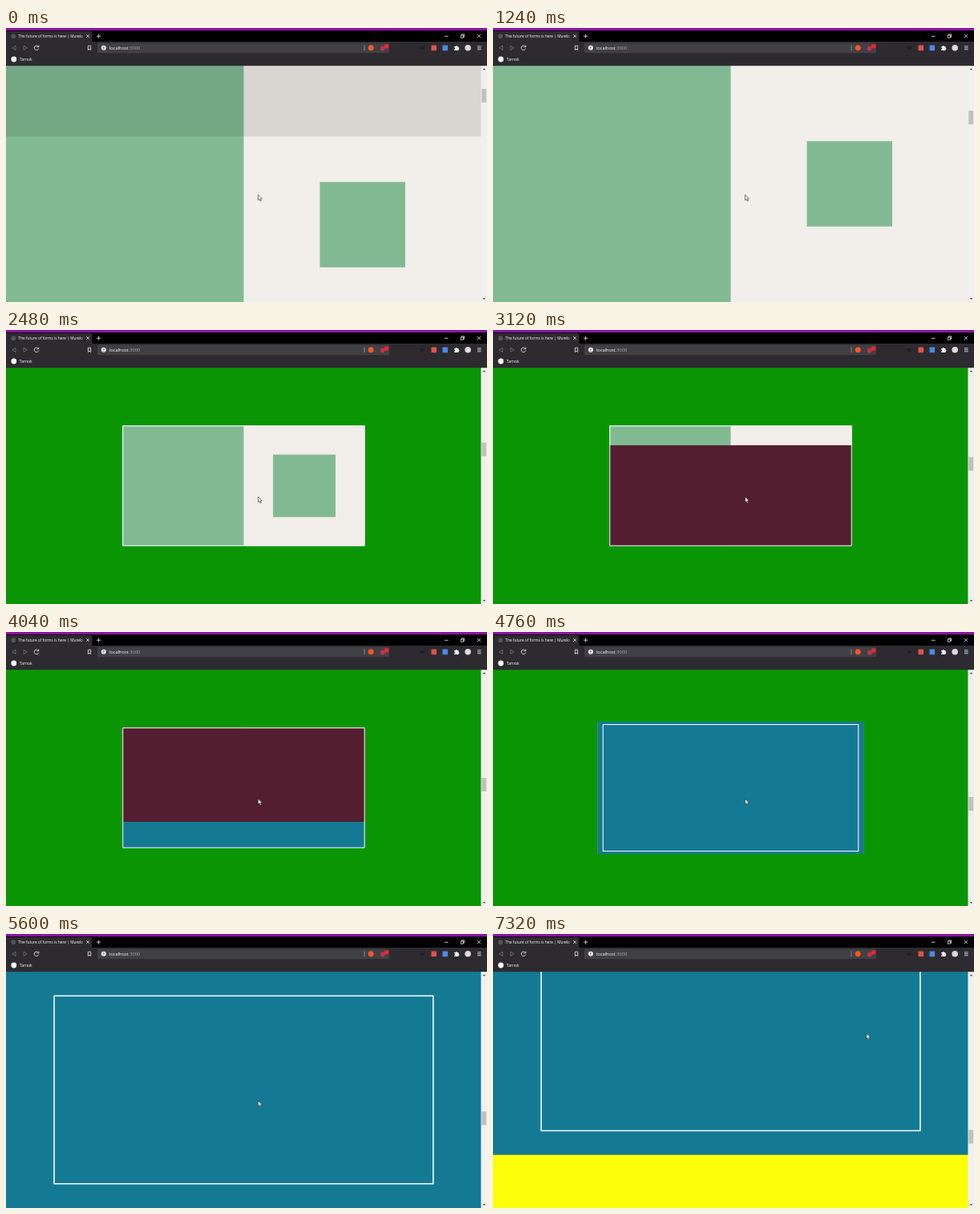
Write an HTML page that moves like this. It is 600 by 342 pixels and loops after 7.36 s.

```html
<!DOCTYPE html>
<html lang="en">
<head>
<meta charset="utf-8">
<title>Scroll-driven frame</title>
<style>
  html, body { margin: 0; width: 100%; height: 100%; overflow: hidden; background: #000; }
  svg { display: block; width: 600px; height: 342px; }
  text { font-family: "Open Sans", "Noto Sans", sans-serif; fill: #fff; }
  .line { fill: none; stroke: #eee; stroke-width: .8; }
  .dim { stroke: #77757b; }
</style>
</head>
<body>
<svg viewBox="0 0 600 342">
  <defs>
    <clipPath id="view"><rect y="47" width="593" height="295"/></clipPath>
    <clipPath id="box"><rect id="boxRect"/></clipPath>
    <clipPath id="tab"><rect y="4" width="95.5" height="13"/></clipPath>
  </defs>

  <g clip-path="url(#view)">
    <rect y="47" width="593" height="295" fill="#0a9604"/>
    <g id="page">
      <g clip-path="url(#box)">
        <rect y="47" width="593" height="295" fill="#f2eee9"/>
        <rect y="47" width="296.5" height="295" fill="#81ba92"/>
        <rect id="square" fill="#81ba92"/>
        <rect id="shade" y="47" width="593" height="88.5" fill-opacity=".1"/>
        <rect id="maroon" width="593" height="295" fill="#531e30"/>
        <rect id="blue" width="593" height="295" fill="#147a93"/>
      </g>
      <rect id="frame" fill="none" stroke="#fbfcfa" stroke-linejoin="round"/>
      <rect y="342" width="593" height="295" fill="#fcff08"/>
    </g>
  </g>

  <!-- scrollbar -->
  <rect x="592.5" y="47" width="7.5" height="295" fill="#f1f0f1"/>
  <path d="M594.7 52.3l1.8-2 1.8 2zM594.7 337l1.8 2 1.8-2z" fill="#505050"/>
  <rect id="thumb" x="593.3" width="5.9" height="17" fill="#c1c0c1"/>

  <!-- window -->
  <rect width="600" height="17.5" fill="#000"/>
  <rect width="600" height="3.2" fill="#8c149f"/>
  <path d="M0 17.5V4h105.5q2 0 2 2v11.5z" fill="#2d2b30"/>
  <rect y="17" width="600" height="30.2" fill="#2d2b30"/>
  <circle cx="9.3" cy="10.2" r="2.9" fill="#55535a"/>
  <text x="15.3" y="12" font-size="4.8" clip-path="url(#tab)">The future of forms is here | Murelo</text>
  <path class="line" d="M100.3 8.3l3.6 3.6m0-3.6l-3.6 3.6M113 10.2h5.2m-2.6-2.6v5.2M547 10.3h4.6M567.3 9h3.2v3.2h-3.2zM568.5 9V7.9h3.2v3.2h-1.1M587.6 7.9l4.4 4.4m0-4.4l-4.4 4.4"/>

  <!-- toolbar -->
  <path class="line dim" d="M12 22.2v5.2l-4.3-2.6zM22 22.2v5.2l4.3-2.6z"/>
  <path class="line" d="M40.3 23.2a2.8 2.8 0 1 0 .4 2.4M40.8 21.6v2.2h-2.2M102.4 22.2h3.3v5.4l-1.65-1.5-1.65 1.5z"/>
  <rect x="114" y="18.4" width="364" height="12.8" rx="1.5" fill="#414044"/>
  <circle cx="121.9" cy="24.8" r="3" fill="#f4f4f4"/>
  <path d="M121.9 23v2.2m0 .8v.8" stroke="#333" stroke-width=".9"/>
  <text x="128.8" y="26.9" font-size="5.7">localhost<tspan fill="#a9a8ac">:3000</tspan></text>
  <path d="M447 21.5v6.6" stroke="#a9a8ac" stroke-width=".7"/>
  <circle cx="455.2" cy="24.8" r="3.5" fill="#f2562b"/>
  <circle cx="469.8" cy="25.5" r="2.9" fill="#c5304f"/>
  <rect x="472" y="20.4" width="5.4" height="5" rx="1.3" fill="#e8282e"/>
  <rect x="516.5" y="23" width="5.5" height="4" rx="1" fill="#222026"/>
  <rect x="530.5" y="21.6" width="6.6" height="6.6" rx="1" fill="#e2514b"/>
  <rect x="544.5" y="21.6" width="6.6" height="6.6" rx=".6" fill="#4b8ae8"/>
  <path d="M559.2 23h1.6a1 1 0 0 1 2 0h1.7v1.7a1 1 0 0 1 0 2v1.4h-5.3v-1.5a1 1 0 0 0 0-2z" fill="#f4f4f4"/>
  <circle cx="576.2" cy="24.8" r="3.8" fill="#dcdcdc"/>
  <path class="line" d="M588 22.8h4.6m-4.6 2h4.6m-4.6 2h4.6"/>
  <circle cx="9.8" cy="39" r="3.4" fill="#fff"/>
  <text x="16.8" y="40.8" font-size="5">Tarnok</text>

  <path id="cursor" d="M0 0v6.8l1.6-1.4 1.1 2.5 1.2-.5-1.1-2.4 2.1-.1z" fill="#fff" stroke="#222" stroke-width=".6"/>
</svg>

<script>
const LOOP = 7360, STEP = 40;
const W = 593, H = 295, TOP = 47, CX = W / 2, CY = TOP + H / 2;
const PX = 17; // page pixels per scrollbar pixel, also one screen in scrollbar pixels

// [ms, scrollbar position]: bursts of the wheel with rests between
const scroll = [
  [0, 76], [520, 85.5], [720, 85.5], [920, 99], [1160, 99], [1360, 109.7],
  [1480, 109.7], [1680, 120], [1800, 125], [1920, 125], [2480, 140.5],
  [2600, 140.5], [3200, 161.3], [3360, 161.3], [3480, 172], [3720, 172],
  [4040, 182], [4160, 182], [4760, 206], [4880, 208.6], [4960, 208.6],
  [5160, 213.5], [5280, 213.5], [5600, 221.5], [5720, 226], [5880, 226],
  [5960, 235], [6200, 235], [6240, 240], [6480, 240], [6960, 244.5]
];

const el = id => document.getElementById(id);
const ramp = (v, from, span) => Math.min(1, Math.max(0, (v - from) / span));
const set = (id, attrs) => {
  for (const k in attrs) el(id).setAttribute(k, attrs[k]);
};
const centred = (cx, cy, width, height) =>
  ({ x: cx - width / 2, y: cy - height / 2, width, height });

function scrollAt(t) {
  const i = scroll.findIndex(k => k[0] > t);
  if (i < 0) return scroll[scroll.length - 1][1];
  const [t0, a] = scroll[i - 1], [t1, b] = scroll[i];
  return a + (b - a) * (t - t0) / (t1 - t0);
}

function draw(t) {
  const s = scrollAt(t);
  const enter = ramp(s, 76, 5.2);
  const shrink = ramp(s, 109.7, PX);
  const grow = ramp(s, 204.3, PX);
  const scale = 1 - .49 * shrink + .49 * grow;
  const w = W * scale, h = H * scale, bottom = CY + h / 2;

  set('boxRect', centred(CX, CY, w, h));
  const side = 106.5 - 28.5 * ramp(s, 127, 13.5);
  set('square', centred(CX + w / 4, CY + 51 * (1 - enter), side, side));
  set('shade', { transform: `translate(0 ${-88.5 * enter})` });
  set('maroon', { y: bottom - h * ramp(s, 144.3, PX) });
  set('blue', { y: bottom - h * ramp(s, 178.3, PX) });

  const fs = .51 + .29 * grow, line = 1.95 * fs;
  set('frame', {
    ...centred(CX, CY, W * fs - line, H * fs - line),
    'stroke-width': line,
    visibility: shrink > 0 ? 'visible' : 'hidden'
  });

  set('page', { transform: `translate(0 ${-Math.max(0, s - 240.6) * PX})` });
  set('thumb', { y: s });
  const m = ramp(t, 6950, 370);
  set('cursor', { transform: `translate(${314.5 + 151.5 * m} ${208.2 - 84.2 * m})` });
}

function tick() {
  const t = performance.now() % LOOP;
  draw(Math.floor(t / STEP) * STEP);
  requestAnimationFrame(tick);
}
tick();
</script>
</body>
</html>
```
